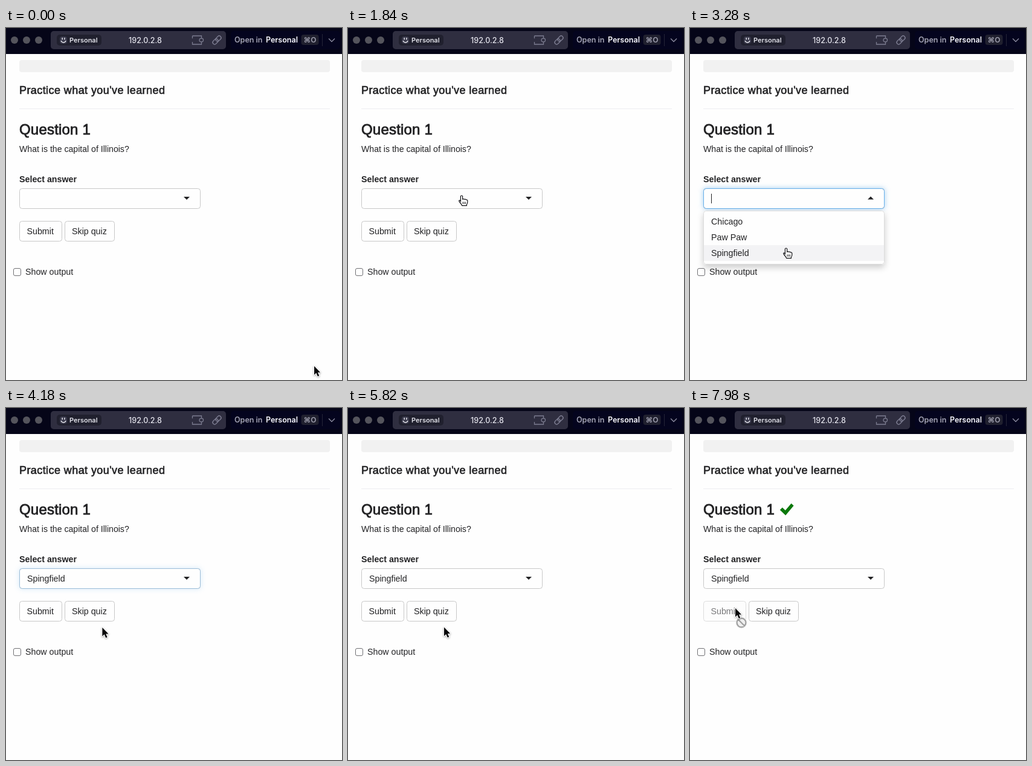
An HTML page with a canvas for the animation above (8 s loop, 556x582 px).

```html
<!DOCTYPE html>
<html lang="en">
<head>
<meta charset="utf-8">
<title>Quiz</title>
<style>
html, body { margin: 0; width: 100%; height: 100%; overflow: hidden; background: #fefefe; }
canvas { display: block; width: 556px; height: 582px; }
</style>
</head>
<body>
<canvas id="stage" width="556" height="582"></canvas>
<script>
const ctx = document.getElementById('stage').getContext('2d');
const LOOP = 8000;
const SANS = '"Liberation Sans", Arial, sans-serif';
const UI = 'Inter, "DejaVu Sans", sans-serif';
const INK = '#222224', PAGE = '#fefefe', EDGE = '#c8c8c8';
const OPTIONS = ['Chicago', 'Paw Paw', 'Spingfield'];

// Moments of the interaction, in ms
const OPEN = 2240, CHOOSE = 4100, PRESS = 6620, RESULT = 7080;

// Pointer path: time, x, y
const PATH = [
  [0, 510, 559], [80, 510, 559], [720, 192, 325], [1020, 192, 325],
  [1400, 188, 276], [2440, 188, 276], [3000, 159, 363], [4100, 159, 363],
  [4300, 160, 363], [5780, 160, 363], [6400, 76, 332], [7080, 76, 332], [7200, 75, 331]
];

const ARROW = new Path2D('M0 0V14.4L3.3 11.3L5.8 17L8.3 15.9L5.9 10.4H10.2Z');
const HAND = new Path2D('M-1.6 9.5V1.4Q-1.4 0 0 0Q1.4 0 1.6 1.4V6Q3.2 4.9 4.6 6.3Q6.4 5.6 7.4 7' +
  'Q9.6 6.6 9.8 8.6V11Q9.6 13.5 8.4 15V16.6H.6Q0 14.5-2 12.5Q-4.5 9.6-4.3 8.4Q-3.2 7-1.6 9.5Z');
const CREASES = new Path2D('M2 10.5V14M4.2 10.5V14M6.4 10.5V14');
const PUZZLE = new Path2D('M308.5 13H323.5V17.2Q320 16.8 320 20Q320 23.2 323.5 22.8V27H308.5V23' +
  'M308.5 13V17.2M323.5 17.2Q326.5 17 326.5 20Q326.5 23 323.5 22.8');
const CHECK = new Path2D('M148.8 168.6L152.8 164.4L157.8 169.2L167.6 157.8L171.6 161.4L158.2 177.4Z');

function text(str, x, y, font, color = INK, align = 'left', spacing = 0) {
  ctx.font = font;
  ctx.fillStyle = color;
  ctx.textAlign = align;
  ctx.letterSpacing = spacing + 'px';
  ctx.fillText(str, x, y);
}

// Medium weight: regular glyphs with a thin outline
function medium(str, x, y, size, spacing) {
  text(str, x, y, `${size}px ${SANS}`, INK, 'left', spacing);
  ctx.strokeStyle = INK;
  ctx.lineWidth = size / 28;
  ctx.strokeText(str, x, y);
}

const body = (str, x, y, size = 14.25) => text(str, x, y, `${size}px ${SANS}`);

function box(x, y, w, h, r, fill, stroke) {
  const inset = stroke ? .5 : 0;
  ctx.beginPath();
  ctx.roundRect(x + inset, y + inset, w - 2 * inset, h - 2 * inset, r);
  if (fill) { ctx.fillStyle = fill; ctx.fill(); }
  if (stroke) { ctx.strokeStyle = stroke; ctx.lineWidth = 1; ctx.stroke(); }
}

function disc(x, y, r, color) {
  ctx.beginPath();
  ctx.arc(x, y, r, 0, 7);
  ctx.fillStyle = color;
  ctx.fill();
}

function line(points, color, width = 1) {
  ctx.beginPath();
  points.forEach(([x, y]) => ctx.lineTo(x, y));
  ctx.strokeStyle = color;
  ctx.lineWidth = width;
  ctx.stroke();
}

function shadow(color, blur, y = 0) {
  ctx.shadowColor = color;
  ctx.shadowBlur = blur;
  ctx.shadowOffsetY = y;
}

function pointerAt(t) {
  const i = PATH.findIndex(p => p[0] > t);
  if (i < 0) return PATH[PATH.length - 1].slice(1);
  const [t0, x0, y0] = PATH[i - 1], [t1, x1, y1] = PATH[i];
  const k = (t - t0) / (t1 - t0), e = k * k * (3 - 2 * k);
  return [x0 + (x1 - x0) * e, y0 + (y1 - y0) * e];
}

function drawFace(x, y) {
  box(x - 6, y - 6, 12, 12, 4, '#3a3a4c');
  ctx.fillStyle = '#ececf2';
  ctx.fillRect(x - 2.5, y - 4, 1.4, 3.4);
  ctx.fillRect(x + 1.2, y - 4, 1.4, 3.4);
  ctx.beginPath();
  ctx.arc(x, y, 4, .25, Math.PI - .25);
  ctx.strokeStyle = '#ececf2';
  ctx.lineWidth = 1.4;
  ctx.stroke();
}

function drawLink(x, y) {
  ctx.save();
  ctx.translate(x, y);
  ctx.rotate(-Math.PI / 4);
  ctx.strokeStyle = '#7c7c90';
  ctx.lineWidth = 1.4;
  for (const dx of [-8.5, -1.5]) {
    ctx.beginPath();
    ctx.roundRect(dx, -3.2, 10, 6.4, 3.2);
    ctx.stroke();
  }
  ctx.restore();
}

function drawToolbar() {
  ctx.fillStyle = '#050518';
  ctx.fillRect(0, 0, 556, 43);
  [14, 34, 54].forEach(x => disc(x, 20, 6, '#54545c'));

  box(74, 5, 290, 30, 5, '#2f2e40');
  box(84, 11, 74, 18, 5, '#20202e');
  drawFace(95, 20);
  text('Personal', 105, 24, `600 11px ${UI}`, '#e2e2ea');
  text('192.0.2.8', 230.5, 24.5, `500 12.5px ${UI}`, '#e6e6ee', 'center');
  ctx.strokeStyle = '#7c7c90';
  ctx.lineWidth = 1.3;
  ctx.stroke(PUZZLE);
  drawLink(349, 20);

  box(372, 5, 181, 30, 5, '#04041e');
  text('Open in', 378, 24, `600 12.5px ${UI}`, '#a4a4b4');
  text('Personal', 430, 24, `600 12.5px ${UI}`, '#fafaff');
  box(488.5, 11, 29, 17, 4, '#20202f');
  text('⌘O', 503, 24, `600 12px ${UI}`, '#a0a0b0', 'center');
  line([[523.5, 10], [523.5, 30]], '#242438');
  line([[534, 17.5], [539, 22.5], [544, 17.5]], '#8c8ca0', 1.3);
}

function drawSelect(t, focus) {
  const open = t >= OPEN && t < CHOOSE;
  if (focus > 0) {
    ctx.save();
    ctx.globalAlpha = focus;
    shadow('rgba(102,175,233,.6)', 8);
    box(22, 265, 300, 34, 4, PAGE);
    ctx.restore();
  }
  box(22, 265, 300, 34, 4, PAGE, EDGE);
  if (focus > 0) {
    ctx.globalAlpha = focus;
    box(22, 265, 300, 34, 4, null, '#66afe9');
    ctx.globalAlpha = 1;
  }

  const [base, tip] = open ? [283.5, 278.5] : [279, 284];
  ctx.beginPath();
  ctx.moveTo(294, base);
  ctx.lineTo(304, base);
  ctx.lineTo(299, tip);
  ctx.fillStyle = INK;
  ctx.fill();

  if (t >= CHOOSE) body(OPTIONS[2], 35, 287);
  if (open && (t - OPEN) % 1000 < 500) {
    ctx.fillStyle = INK;
    ctx.fillRect(35, 274, 1, 16);
  }
}

function drawMenu(y) {
  ctx.save();
  shadow('rgba(0,0,0,.2)', 11, 5);
  box(22, 302, 300, 89, 4, PAGE);
  ctx.restore();
  box(22, 302, 300, 89, 4, PAGE, '#dcdcdc');
  const active = Math.max(0, Math.min(2, Math.floor((y - 307) / 26)));
  ctx.fillStyle = '#f3f3f5';
  ctx.fillRect(23, 307 + active * 26, 298, 26);
  OPTIONS.forEach((name, i) => body(name, 35, 325 + i * 26));
}

function drawButtons(t, hover) {
  const done = t >= RESULT;
  const fill = !hover || done ? PAGE : t >= PRESS ? '#dadada' : '#e6e6e6';
  ctx.globalAlpha = done ? .6 : 1;
  box(22, 319, 71, 34, 4, fill, hover && !done ? '#a8a8a8' : EDGE);
  body('Submit', 34.5, 341);
  ctx.globalAlpha = 1;
  box(97, 319, 83, 34, 4, PAGE, EDGE);
  body('Skip quiz', 109, 341);
}

function drawPage(t, x, y, onSubmit) {
  ctx.fillStyle = PAGE;
  ctx.fillRect(0, 43, 556, 539);
  box(22, 53, 514, 20, 4, '#f1f1f1');
  medium("Practice what you've learned", 22, 109, 18, .42);
  line([[22, 133.5], [536, 133.5]], '#eeeef2');
  medium('Question 1', 22, 176, 24, .2);
  if (t >= RESULT) {
    ctx.fillStyle = '#0b780b';
    ctx.fill(CHECK);
  }
  body('What is the capital of Illinois?', 22, 205, 14.1);
  text('Select answer', 22, 255, `bold 14.25px ${SANS}`);

  const fade = v => Math.max(0, Math.min(1, v / 150));
  drawSelect(t, fade(t - OPEN) - fade(t - CHOOSE));
  drawButtons(t, onSubmit);
  box(12, 397, 13, 13, 2.5, '#ffffff', '#707074');
  body('Show output', 32, 408);
  if (t >= OPEN && t < CHOOSE) drawMenu(y);
}

function drawHand() {
  ctx.translate(0, 1);
  ctx.fillStyle = '#ffffff';
  ctx.fill(HAND);
  ctx.strokeStyle = '#101014';
  ctx.lineWidth = 1.2;
  ctx.stroke(HAND);
  ctx.lineWidth = .9;
  ctx.stroke(CREASES);
}

function drawArrow() {
  ctx.lineJoin = 'round';
  ctx.lineWidth = 2;
  ctx.strokeStyle = '#ffffff';
  shadow('rgba(0,0,0,.35)', 3, 1);
  ctx.stroke(ARROW);
  shadow('transparent', 0);
  ctx.fillStyle = '#060608';
  ctx.fill(ARROW);
}

function drawForbidden() {
  disc(10, 24, 9.5, '#f0f0f0');
  ctx.beginPath();
  ctx.arc(10, 24, 7.4, 0, 7);
  ctx.moveTo(4.8, 18.8);
  ctx.lineTo(15.2, 29.2);
  ctx.strokeStyle = '#a0a0a0';
  ctx.lineWidth = 2.2;
  ctx.stroke();
}

function drawPointer(t, x, y, hand) {
  ctx.save();
  ctx.translate(x, y);
  if (hand) drawHand();
  else {
    if (t >= RESULT) drawForbidden();
    drawArrow();
  }
  ctx.restore();
}

function render(t) {
  const [x, y] = pointerAt(t);
  const inside = (l, top, r, b) => x >= l && x <= r && y >= top && y <= b;
  const onSubmit = inside(22, 319, 93, 353);
  const onSkip = inside(97, 319, 180, 353);
  const onMenu = t >= OPEN && t < CHOOSE && inside(22, 302, 322, 391);
  const hand = t < RESULT && (onSubmit || onSkip || onMenu || inside(22, 265, 322, 299));
  drawPage(t, x, y, onSubmit);
  drawToolbar();
  drawPointer(t, x, y, hand);
}

function frame() {
  render(performance.now() % LOOP);
  requestAnimationFrame(frame);
}
frame();
</script>
</body>
</html>
```
